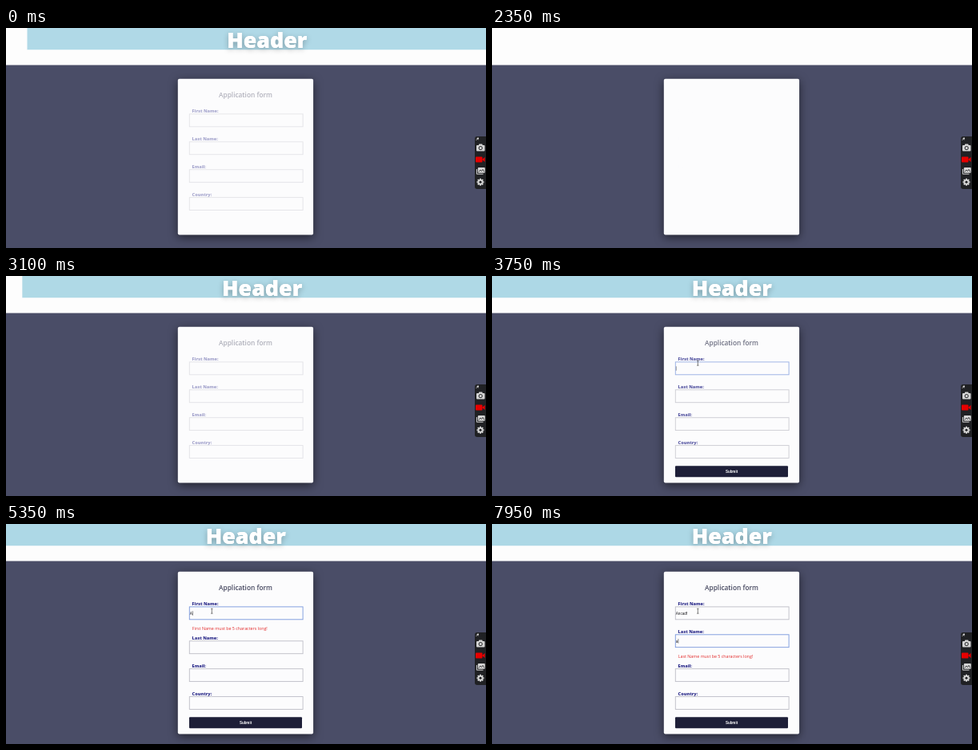
Write an HTML page with a canvas that moves like this. It is 600 by 276 pixels and loops after 8 s.

```html
<!DOCTYPE html>
<html lang="en">
<head>
<meta charset="utf-8">
<title>Application form</title>
<style>
  html, body { margin: 0; width: 100%; height: 100%; overflow: hidden; background: #4a4d67; }
  canvas { display: block; width: 600px; height: 276px; }
</style>
</head>
<body>
<canvas id="stage"></canvas>
<script>
const W = 600, H = 276, LOOP = 8000;
const RELOAD = 2334, LEAD = 736;
const SANS = '"Open Sans", "Noto Sans", sans-serif';
const ARIAL = '"Liberation Sans", Arial, sans-serif';
const LABELS = ['First Name', 'Last Name', 'Email', 'Country'];

// Typing and focus: [time, field, value]
const KEYS = [
  [3650, 0, ''], [5200, 0, 'A'], [6200, 0, 'An'], [6550, 0, 'Anc'], [6900, 0, 'Anca'],
  [7250, 0, 'Ancad'], [7380, 0, 'Ancadf'], [7520, 1, ''], [7750, 1, 'a']
];

const canvas = document.getElementById('stage');
const ctx = canvas.getContext('2d');
const dpr = window.devicePixelRatio || 1;
canvas.width = W * dpr;
canvas.height = H * dpr;

const clamp = v => Math.max(0, Math.min(1, v));

// CSS "ease": cubic-bezier(.25, .1, .25, 1)
function ease(x) {
  x = clamp(x);
  if (x === 0 || x === 1) return x;
  const curve = (s, a, b) => 3 * s * (1 - s) ** 2 * a + 3 * s * s * (1 - s) * b + s ** 3;
  let lo = 0, hi = 1;
  for (let i = 0; i < 24; i++) {
    const mid = (lo + hi) / 2;
    if (curve(mid, 0.25, 0.25) < x) lo = mid; else hi = mid;
  }
  return curve(lo, 0.1, 1);
}

function box(x, y, w, h, fill, r = 0) {
  ctx.fillStyle = fill;
  ctx.beginPath();
  ctx.roundRect(x, y, w, h, r);
  ctx.fill();
}

function text(str, x, y, font, color, align = 'left') {
  ctx.font = font;
  ctx.fillStyle = color;
  ctx.textAlign = align;
  ctx.fillText(str, x, y);
}

function shadow(color, blur, dy) {
  ctx.shadowColor = color;
  ctx.shadowBlur = blur * dpr;
  ctx.shadowOffsetY = dy * dpr;
}

function line(points, color, width) {
  ctx.strokeStyle = color;
  ctx.lineWidth = width;
  ctx.beginPath();
  points.forEach(([x, y], i) => i ? ctx.lineTo(x, y) : ctx.moveTo(x, y));
  ctx.stroke();
}

function header(phase) {
  const p = ease(phase / 1000);
  box(0, 0, W, 46.4, '#fdfdfd');
  ctx.save();
  ctx.beginPath();
  ctx.rect(0, 0, W, 46);
  ctx.clip();
  ctx.globalAlpha = p;
  ctx.translate(W * (1 - p), 0);
  box(0, 0, W, 27.3, '#add8e6');
  const title = () => text('Header', 299.8, 24.7, '800 26.8px ' + SANS, '#fff', 'center');
  shadow('rgba(0,0,0,.28)', 7, 2);
  title();
  // white lettering stays solid over its own shadow while fading in
  shadow('transparent', 0, 0);
  ctx.globalAlpha = clamp(p * 2);
  title();
  ctx.restore();
}

function formState(t) {
  const values = ['', '', '', ''];
  let focus = -1, last = 0;
  for (const [at, field, value] of KEYS) {
    if (t < at) break;
    values[field] = value;
    focus = field;
    last = at;
  }
  const error = values.findIndex(v => v && v.length < 5);
  return { values, focus, last, error };
}

function field(i, shift, state, t) {
  const y = 107.5 + 34.9 * i + shift;
  const active = state.focus === i;
  text(LABELS[i] + ':', 232.6, 106 + 34.9 * i + shift, '800 5.55px ' + SANS, '#2f2f8c');
  ctx.strokeStyle = active ? '#7897dc' : '#bdbdc6';
  ctx.lineWidth = 0.9;
  ctx.strokeRect(229.3, y + 0.4, 141.8, 15.9);
  const font = '4.6px ' + ARIAL;
  text(state.values[i], 229.8, y + 10.5, font, '#1c1c20');
  if (active && Math.floor((t - state.last) / 500) % 2 === 0) {
    const x = 230.3 + ctx.measureText(state.values[i]).width;
    line([[x, y + 5.8], [x, y + 11.2]], '#333', 0.6);
  }
  if (state.error === i) {
    text(LABELS[i] + ' must be 5 characters long!', 232.8, y + 29.9, '5.33px ' + SANS, '#e32a2a');
  }
}

function form(t, phase) {
  const state = formState(t);
  const grow = state.error >= 0 ? 4 : 0;
  ctx.save();
  shadow('rgba(0,0,0,.55)', 12, 3);
  box(214.8, 63.8 - grow, 169.3, 195.7 + 2 * grow, '#fcfcfd', 2);
  ctx.restore();

  ctx.save();
  ctx.globalAlpha = ease(phase / 3000);
  text('Application form', 299.5, 87.2 - grow, '600 8.3px ' + SANS, '#45475f', 'center');
  LABELS.forEach((_, i) => field(i, i > state.error ? grow : -grow, state, t));

  ctx.globalAlpha = clamp((phase - 1050) / 250);
  box(229, 238.2 + grow, 141, 14, '#1e1f38', 1);
  text('Submit', 299.5, 246.9 + grow, '700 4.5px ' + ARIAL, '#fff', 'center');
  ctx.restore();
}

function toolbar() {
  const ink = '#d4d4d4', dark = '#202124';
  box(586, 136, 18, 66, dark, 3);
  // pin
  line([[587.5, 141], [589, 139.4]], ink, 0.7);
  line([[588.2, 138.4], [590.2, 140.4]], ink, 0.8);
  box(589, 137.5, 2, 2, ink, 0.5);
  // camera
  box(588, 147, 10.5, 7.5, ink, 1);
  box(591, 145.6, 4.5, 2.5, ink, 0.6);
  ring(593.2, 150.6, 2.1, dark, 1);
  // recorder
  box(587, 161.5, 8.5, 7, '#e60000', 1);
  ctx.fillStyle = '#e60000';
  ctx.beginPath();
  ctx.moveTo(595, 165);
  ctx.lineTo(598.6, 162);
  ctx.lineTo(598.6, 168);
  ctx.fill();
  // pictures
  line([[588.4, 177], [588.4, 183.2], [596.5, 183.2]], ink, 1);
  box(589.8, 175, 9, 6.8, ink, 1);
  line([[591, 180.4], [593, 178], [594.4, 179.6], [596, 177.4], [597.8, 180.4]], dark, 0.8);
  // gear
  for (let k = 0; k < 4; k++) {
    const a = k * Math.PI / 4, dx = 4.5 * Math.cos(a), dy = 4.5 * Math.sin(a);
    line([[593 - dx, 193.3 - dy], [593 + dx, 193.3 + dy]], ink, 1.9);
  }
  ring(593, 193.3, 2.4, ink, 2);
  ctx.fillStyle = dark;
  ctx.beginPath();
  ctx.arc(593, 193.3, 1.5, 0, 7);
  ctx.fill();
}

function ring(x, y, r, color, width) {
  ctx.strokeStyle = color;
  ctx.lineWidth = width;
  ctx.beginPath();
  ctx.arc(x, y, r, 0, 2 * Math.PI);
  ctx.stroke();
}

function pointer(t) {
  if (t < 3380) return;
  const p = ease((t - 3380) / 220);
  const x = 268 - 10.7 * p, y = 20 + 89.2 * p;
  line([[x, y - 3], [x, y + 3]], '#444', 0.7);
  for (const s of [-3, 3]) line([[x - 1.3, y + s], [x + 1.3, y + s]], '#444', 0.6);
}

function draw(t) {
  const phase = t < RELOAD ? t + LEAD : t - RELOAD;
  ctx.setTransform(dpr, 0, 0, dpr, 0, 0);
  box(0, 0, W, H, '#4a4d67');
  header(phase);
  form(t, phase);
  toolbar();
  pointer(t);
}

const start = performance.now();
function tick() {
  draw((performance.now() - start) % LOOP);
  requestAnimationFrame(tick);
}
tick();
</script>
</body>
</html>
```
